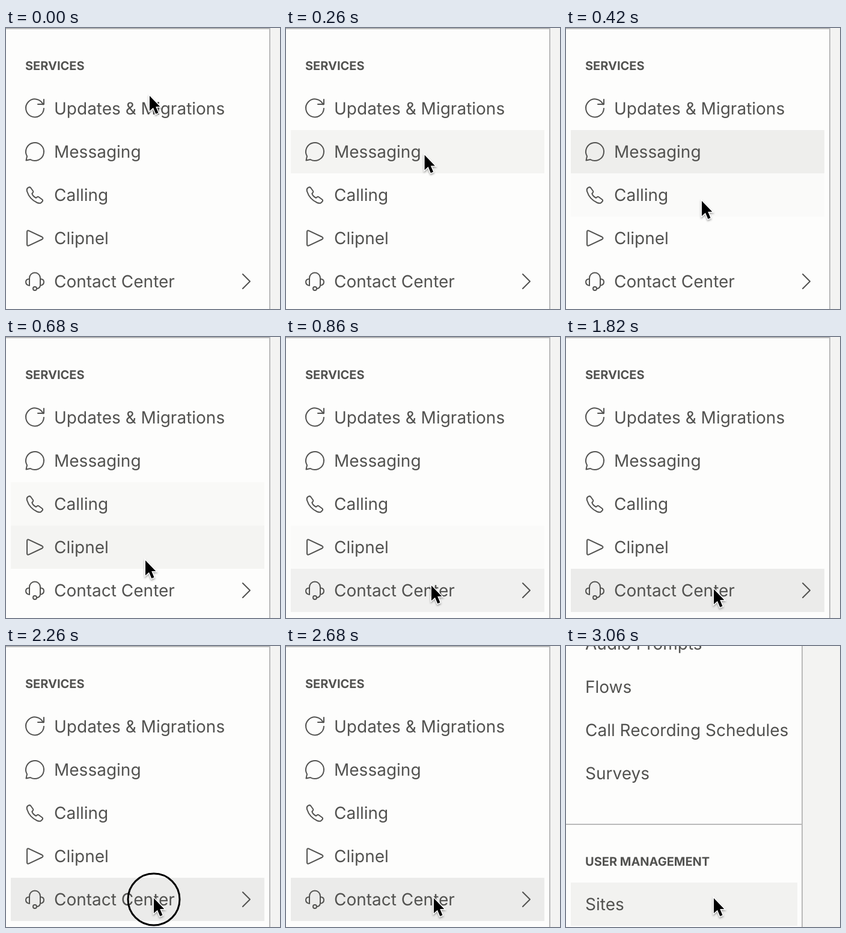
Recreate the animation shown at these times as an HTML page. Size 456 by 468 pixels, loop 3.16 s.

```html
<!DOCTYPE html>
<html lang="en">
<head>
<meta charset="utf-8">
<title>Side menu</title>
<style>
  html, body { margin: 0; width: 100%; height: 100%; overflow: hidden; background: #fdfdfc; }
  svg { display: block; width: 456px; height: 468px; }
  text { font: 400 28px Inter, Roboto, sans-serif; fill: #525250; text-rendering: geometricPrecision; }
  .head { font-size: 20px; font-weight: 700; }
  .strip { fill: #f3f3f2; }
  .line { fill: #bababa; }
  .row { fill: #ebebea; opacity: 0; }
  .icon { fill: none; stroke: #525250; stroke-width: 2; stroke-linejoin: round; stroke-linecap: round; }
  .arrow { stroke: #fff; stroke-width: 3; paint-order: stroke; filter: drop-shadow(0 2px 1.5px #0005); }
</style>
</head>
<body>
<svg viewBox="0 0 456 468">
  <g id="services">
    <rect class="strip" x="440" width="16" height="468"/>
    <rect class="line" width="440" height="2"/>
    <rect class="line" x="438" width="2" height="468"/>
    <rect class="row" x="8" y="98" width="422" height="72"/>
    <rect class="row" x="8" y="170" width="422" height="72"/>
    <rect class="row" x="8" y="242" width="422" height="72"/>
    <rect class="row" x="8" y="314" width="422" height="72"/>
    <rect class="row" x="8" y="386" width="422" height="72"/>
    <text class="head" x="32" y="70">SERVICES</text>
    <text x="80" y="144">Updates &amp; Migrations</text>
    <text x="80" y="216">Messaging</text>
    <text x="80" y="288">Calling</text>
    <text x="80" y="360">Clipnel</text>
    <text x="80" y="432">Contact Center</text>
    <g class="icon">
      <path transform="translate(32 118)" d="M31 1V9H21M29.8 9.5A15 15 0 1 0 31 16"/>
      <path transform="translate(32 190)" d="M3 23.5A15 15 0 1 1 8.5 29L1.5 30.5Z"/>
      <path transform="translate(32 262)" d="M4 4.5Q7 2 9 4L13 9.5Q14 11 12.5 12.5L11.3 13.8Q13 18.5 18 21L19.5 19.8Q21 18.5 22.5 19.5L28 23.5Q30 25 28.5 27L26 29.3Q24 30.5 20 29Q7 23 3 10Q2 6.5 4 4.5Z"/>
      <path transform="translate(32 334)" d="M3 5.5V26.5Q3 29.5 6 28.3L28 18Q31 16 28 14L6 3.7Q3 2.5 3 5.5Z"/>
      <g transform="translate(32 406)">
        <path d="M7 23V10.5A9 9 0 0 1 25 10.5V23M7 12Q1 12 1 17T7 23M25 12Q31 12 31 17T25 23Q24 28 19 28"/>
        <circle cx="16" cy="28" r="3"/>
      </g>
      <path d="M394 410L406 422L394 434"/>
    </g>
  </g>
  <g id="center">
    <rect class="strip" x="394" width="62" height="468"/>
    <rect class="line" x="392" width="2" height="468"/>
    <rect class="line" y="296" width="392" height="2"/>
    <rect class="row" x="8" y="394" width="377" height="72"/>
    <text x="32" y="6">Audio Prompts</text>
    <text x="32" y="78">Flows</text>
    <text x="32" y="150">Call Recording Schedules</text>
    <text x="32" y="222">Surveys</text>
    <text class="head" x="32" y="366">USER MANAGEMENT</text>
    <text x="32" y="440">Sites</text>
  </g>
  <circle id="click" cx="246" cy="422" r="43" fill="none" stroke="#000" stroke-width="3"/>
  <path id="cursor" class="arrow" d="M0 0V25L6 19.7L10.3 30L14.5 28.2L10.2 18H17.3Z"/>
</svg>
<script>
  const LOOP = 3160, PAGE_CUT = 61, CLICK = [48, 51];
  const $ = id => document.getElementById(id);
  const rows = [...document.querySelectorAll('.row')];

  // Steps at which the pointer enters and leaves each row
  const hovers = [[0.5, 2.5], [2.5, 8], [8, 11.5], [11.5, 15.5], [15.5, 99], [62, 99]];
  // Pointer path: step, x, y
  const path = [[0, 239, 113], [9, 226, 288], [14, 232, 372], [19, 242, 414], [25, 246, 420]];

  const clamp = v => Math.min(1, Math.max(0, v));

  // Uneven playback: each 140 ms holds steps of 100, 20 and 20 ms
  function stepAt(ms) {
    if (ms < 20) return 0;
    const k = Math.floor((ms - 20) / 140), r = (ms - 20) % 140;
    return 1 + 3 * k + (r < 100 ? 0 : r < 120 ? 1 : 2);
  }

  function slope(i, axis) {
    if (i === path.length - 1) return 0;
    const a = path[Math.max(0, i - 1)], b = path[i + 1];
    return (b[axis] - a[axis]) / (b[0] - a[0]);
  }

  // Smooth curve through the path points
  function along(n, axis) {
    const last = path.length - 1;
    if (n >= path[last][0]) return path[last][axis];
    const i = path.findIndex(p => p[0] > n) - 1;
    const a = path[i], b = path[i + 1], d = b[0] - a[0], u = (n - a[0]) / d;
    const s = u * u * (3 - 2 * u);
    return a[axis] + (b[axis] - a[axis]) * s
      + d * u * (1 - u) * ((1 - u) * slope(i, axis) - u * slope(i + 1, axis));
  }

  // Background fades in over 5 steps and out over 6
  function glow(n, [enter, leave]) {
    return clamp((Math.min(n, leave) - enter) / 5) - Math.max(0, n - leave) / 6;
  }

  const show = (el, on) => el.style.display = on ? '' : 'none';

  function draw(now) {
    const n = stepAt(now % LOOP);
    rows.forEach((row, i) => row.style.opacity = clamp(glow(n, hovers[i])));
    show($('services'), n < PAGE_CUT);
    show($('center'), n >= PAGE_CUT);
    show($('click'), n >= CLICK[0] && n < CLICK[1]);
    $('cursor').setAttribute('transform', `translate(${along(n, 1)} ${along(n, 2)})`);
  }

  const start = performance.now();
  function tick() {
    draw(performance.now() - start);
    requestAnimationFrame(tick);
  }
  tick();
</script>
</body>
</html>
```
